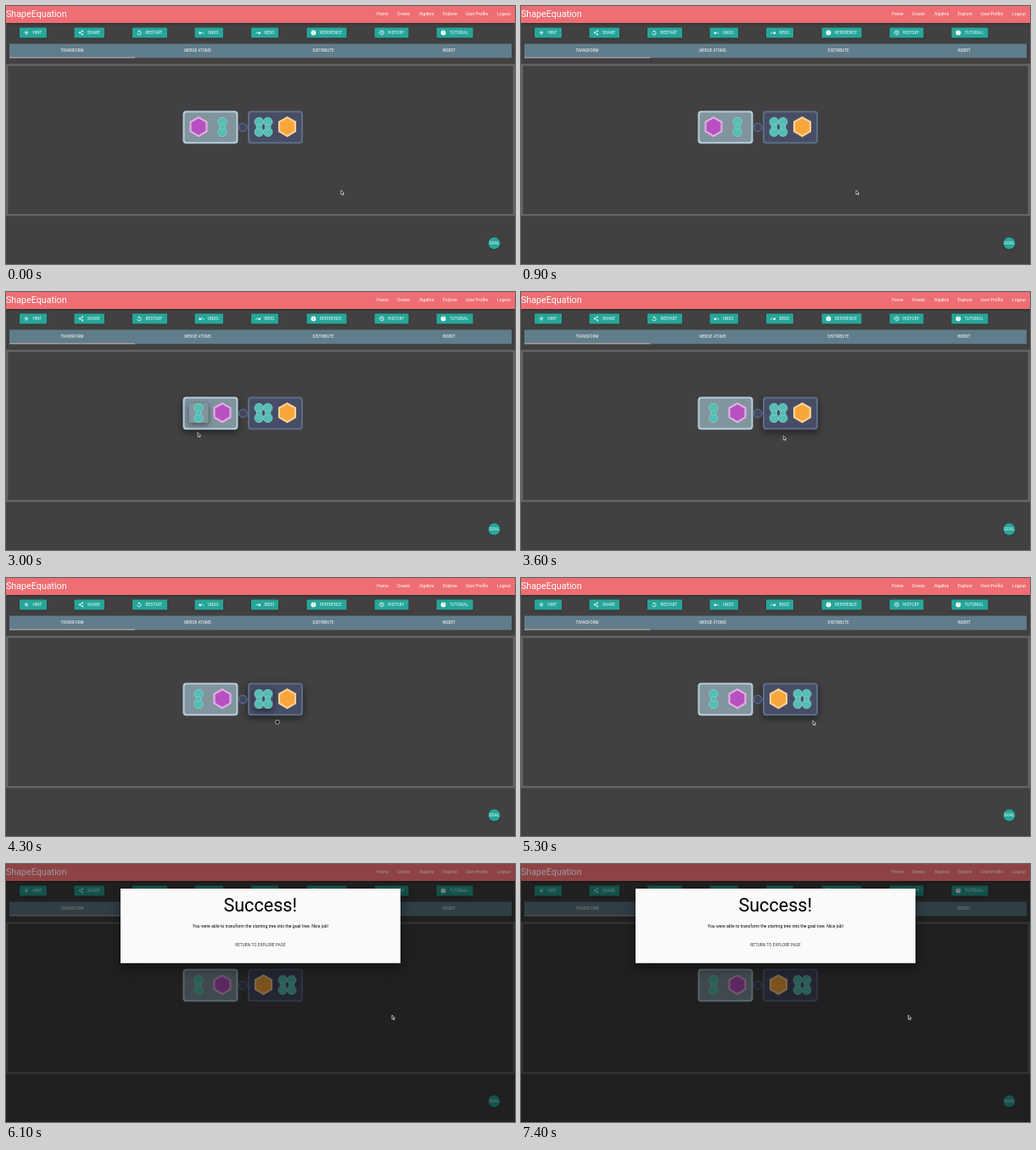
An HTML page with a canvas that plays this animation: 600 px wide and 304 px high, repeating every 8.9 s.

```html
<!DOCTYPE html>
<html lang="en">
<head>
<meta charset="utf-8">
<title>Shape puzzle</title>
<style>
html, body { margin: 0; width: 100%; height: 100%; overflow: hidden; background: #424041; }
canvas { display: block; width: 600px; height: 304px; }
</style>
</head>
<body>
<canvas id="stage"></canvas>
<script>
const W = 600, H = 304, LOOP = 8900, STEP = 100;
const TEAL = '#26a69a', BG = '#424041', FONT = 'Roboto, sans-serif';
const canvas = document.getElementById('stage');
const ctx = canvas.getContext('2d');
const dpr = window.devicePixelRatio || 1;
canvas.width = W * dpr;
canvas.height = H * dpr;

// Each key is [time, ...values]; values ease between neighbours.
const POINTER = [
  [1000, 395, 217], [1200, 378, 221], [1700, 259.5, 162], [2100, 259.5, 162],
  [2700, 226, 165.5], [3000, 226, 165.5], [3300, 262, 177], [3700, 318, 168],
  [4300, 318, 167.5], [4600, 326, 166], [4900, 326.5, 166], [5100, 340, 167],
  [5200, 340, 167], [5300, 344, 168], [5400, 451.5, 177.5], [6100, 455, 178],
  [7300, 455.5, 178], [7400, 456.5, 178]
];
const PAIR = [[2100, 255], [2700, 227]];
const PURPLE = [[2400, 227], [2700, 255]];
const QUAD = [[4300, 303.5], [4600, 309], [4900, 309], [5100, 331.5]];
const ORANGE = [[4800, 331.5], [5100, 303.5]];

function track(keys, t) {
  if (t <= keys[0][0]) return keys[0].slice(1);
  for (let i = 1; i < keys.length; i++) {
    const a = keys[i - 1], b = keys[i];
    if (t <= b[0]) {
      const p = (t - a[0]) / (b[0] - a[0]), e = p * p * (3 - 2 * p);
      return a.slice(1).map((v, k) => v + (b[k + 1] - v) * e);
    }
  }
  return keys[keys.length - 1].slice(1);
}

const during = (t, from, to) => t >= from && t < to;

function rect(x, y, w, h, fill) {
  ctx.fillStyle = fill;
  ctx.fillRect(x, y, w, h);
}

function round(x, y, w, h, r, fill) {
  ctx.beginPath();
  ctx.roundRect(x, y, w, h, r);
  ctx.fillStyle = fill;
  ctx.fill();
}

function disc(x, y, r, fill) {
  ctx.beginPath();
  ctx.arc(x, y, r, 0, Math.PI * 2);
  ctx.fillStyle = fill;
  ctx.fill();
}

function line(points, close) {
  ctx.beginPath();
  points.forEach(([x, y]) => ctx.lineTo(x, y));
  if (close) ctx.closePath();
}

function arc(x, y, r, from, to) {
  ctx.beginPath();
  ctx.arc(x, y, r, from, to);
  ctx.stroke();
}

function text(str, x, y, size, fill = '#fff', align = 'left', spacing = 0) {
  ctx.font = `400 ${size}px ${FONT}`;
  ctx.letterSpacing = spacing + 'px';
  ctx.textAlign = align;
  ctx.fillStyle = fill;
  ctx.fillText(str, x, y);
}

function shadowed(alpha, blur, dy, draw) {
  ctx.save();
  ctx.shadowColor = `rgba(0,0,0,${alpha})`;
  ctx.shadowBlur = blur * dpr;
  ctx.shadowOffsetY = dy * dpr;
  draw();
  ctx.restore();
}

// Icons are drawn around the origin, about 6 px across.
function turnBack() {
  ctx.beginPath();
  ctx.moveTo(-1.8, 0.3);
  ctx.quadraticCurveTo(1.3, -2.1, 2.8, 1.5);
  ctx.stroke();
  line([[-2.9, -1.6], [-2.9, 1.5], [0, 1.5]], true);
  ctx.fill();
}

function badge(sign) {
  disc(0, 0, 2.9, '#fff');
  text(sign, 0, 1.6, 4.6, TEAL, 'center');
}

const ICONS = {
  hint() {
    disc(0, 0, 1.1, '#fff');
    for (let i = 0; i < 8; i++) {
      const a = i * Math.PI / 4, c = Math.cos(a), s = Math.sin(a);
      line([[c * 1.7, s * 1.7], [c * 2.5, s * 2.5]]);
      ctx.stroke();
    }
  },
  share() {
    line([[1.7, -2], [-1.7, 0], [1.7, 2]]);
    ctx.stroke();
    [[1.7, -2], [-1.7, 0], [1.7, 2]].forEach(([x, y]) => disc(x, y, 0.9, '#fff'));
  },
  restart() {
    arc(0, 0.4, 2.1, -Math.PI / 2, Math.PI);
    line([[0.1, -3.2], [0.1, -0.3], [-1.5, -1.7]], true);
    ctx.fill();
  },
  undo: turnBack,
  redo() {
    ctx.scale(-1, 1);
    turnBack();
  },
  info() { badge('i'); },
  history() {
    arc(0.4, 0, 2.4, -Math.PI, Math.PI * 0.75);
    line([[-3.3, 0], [-0.8, 0], [-2, 1.4]], true);
    ctx.fill();
    line([[0.4, -1.4], [0.4, 0.2], [1.5, 0.8]]);
    ctx.stroke();
  },
  help() { badge('?'); }
};

const BUTTONS = [
  ['hint', 'HINT', 16, 32], ['share', 'SHARE', 80.5, 35.5],
  ['restart', 'RESTART', 149, 41], ['undo', 'UNDO', 222.5, 33.5],
  ['redo', 'REDO', 289, 32], ['info', 'REFERENCE', 354.5, 47],
  ['history', 'HISTORY', 434.5, 40], ['help', 'TUTORIAL', 507.5, 43]
];
const LINKS = [['Home', 437], ['Create', 461], ['Algebra', 487],
  ['Explore', 515], ['User Profile', 542], ['Logout', 579]];
const TABS = ['TRANSFORM', 'MERGE ATOMS', 'DISTRIBUTE', 'INSERT'];

function button([icon, label, x, w]) {
  shadowed(0.3, 2, 0.7, () => round(x, 25.5, w, 12, 0.8, TEAL));
  ctx.save();
  ctx.translate(x + 8, 31.4);
  ctx.strokeStyle = ctx.fillStyle = '#fff';
  ctx.lineWidth = 0.75;
  ICONS[icon]();
  ctx.restore();
  text(label, x + 15.5, 33, 4.5, '#fff', 'left', 0.16);
}

function page() {
  rect(0, 0, W, H, BG);
  shadowed(0.35, 2, 0.6, () => rect(0, 0, W, 20, '#ee6e73'));
  text('ShapeEquation', 0, 13, 10.7);
  LINKS.forEach(([label, x]) => text(label, x, 11, 5.1));
  BUTTONS.forEach(button);
  rect(4, 44.5, 592, 16.7, '#607d8b');
  TABS.forEach((label, i) => text(label, 78 + i * 148, 54.3, 4.5, '#fff', 'center', 0.05));
  rect(4, 60.4, 148, 0.9, '#d6b6b5');
  ctx.strokeStyle = '#666566';
  ctx.lineWidth = 2.4;
  ctx.strokeRect(1.2, 69.4, W - 2.4, 176.8);
  shadowed(0.3, 2, 0.8, () => disc(575.5, 279.6, 7, TEAL));
  text('GOAL', 575.6, 281.2, 4.5, '#fff', 'center', 0.1);
}

function box(x, edge, fill, raised) {
  const draw = () => round(x, 123.5, 65, 38.7, 4, edge);
  if (raised) shadowed(0.5, 8, 3, draw);
  else draw();
  round(x + 2, 125.5, 61, 34.7, 2.4, fill);
}

function hexagon(x, edge, fill) {
  [[12.2, edge], [9.7, fill]].forEach(([r, color]) => {
    line(Array.from({ length: 6 }, (_, i) => {
      const a = (i - 0.5) * Math.PI / 3;
      return [x + r * Math.cos(a), 142.2 + r * Math.sin(a)];
    }), true);
    ctx.fillStyle = color;
    ctx.fill();
  });
}

function pair(x) {
  ctx.strokeStyle = '#83d0c8';
  ctx.lineWidth = 0.8;
  [[136.6, 5.3], [148.4, 5.3], [142.5, 3.3]].forEach(([y, r]) => {
    disc(x, y, r, '#55bdb3');
    ctx.stroke();
  });
}

function tile(x, fill) {
  shadowed(0.5, 6, 2, () => round(x - 11.5, 130.7, 23, 23.5, 2.5, fill));
}

function pieces(t) {
  const leftFill = '#82949d', rightFill = '#464d65';
  box(208.5, '#b2cedb', leftFill, during(t, 1500, 3200));
  box(285, '#5c6d86', rightFill, during(t, 3500, 5400));
  disc(279.2, 143, 4.7, '#40465f');
  ctx.strokeStyle = '#596982';
  ctx.lineWidth = 1.5;
  ctx.stroke();

  const [pairX] = track(PAIR, t), [quadX] = track(QUAD, t);
  hexagon(track(PURPLE, t)[0], '#deb1e3', '#b950c2');
  if (during(t, 1600, 3100)) tile(pairX, leftFill);
  pair(pairX);
  hexagon(track(ORANGE, t)[0], '#fbd09a', '#f8a63a');
  if (during(t, 3700, 5200)) tile(quadX, rightFill);
  pair(quadX - 5.2);
  pair(quadX + 5.2);
}

function modal() {
  rect(0, 0, W, 20, 'rgba(0,0,0,0.4)');
  rect(0, 20, W, H - 20, 'rgba(0,0,0,0.5)');
  shadowed(0.45, 14, 6, () => rect(135, 29, 330, 87.8, '#fafafa'));
  text('Success!', 299.7, 56.3, 21.6, '#000', 'center');
  text('You were able to transform the starting tree into the goal tree. Nice job!',
    300, 74.8, 5.1, '#000', 'center');
  text('RETURN TO EXPLORE PAGE', 300, 97, 4.5, '#343434', 'center', 0.16);
}

function pointer(t) {
  const [x, y] = track(POINTER, t);
  ctx.save();
  ctx.translate(x, y);
  ctx.strokeStyle = '#eee';
  ctx.lineWidth = 0.7;
  ctx.lineJoin = 'round';
  if (during(t, 2100, 2800) || during(t, 4100, 5200)) {
    ctx.beginPath();
    ctx.roundRect(-0.4, 0.2, 4.6, 4.2, 1.6);
  } else {
    line([[0, 0], [0, 5], [1.2, 4], [2, 5.8], [2.9, 5.4], [2.1, 3.7], [3.6, 3.6]], true);
  }
  ctx.fillStyle = '#151515';
  ctx.fill();
  ctx.stroke();
  ctx.restore();
}

function frame() {
  const t = Math.floor(performance.now() % LOOP / STEP) * STEP;
  ctx.setTransform(dpr, 0, 0, dpr, 0, 0);
  page();
  pieces(t);
  if (t >= 5400) modal();
  pointer(t);
  requestAnimationFrame(frame);
}
requestAnimationFrame(frame);
</script>
</body>
</html>
```
